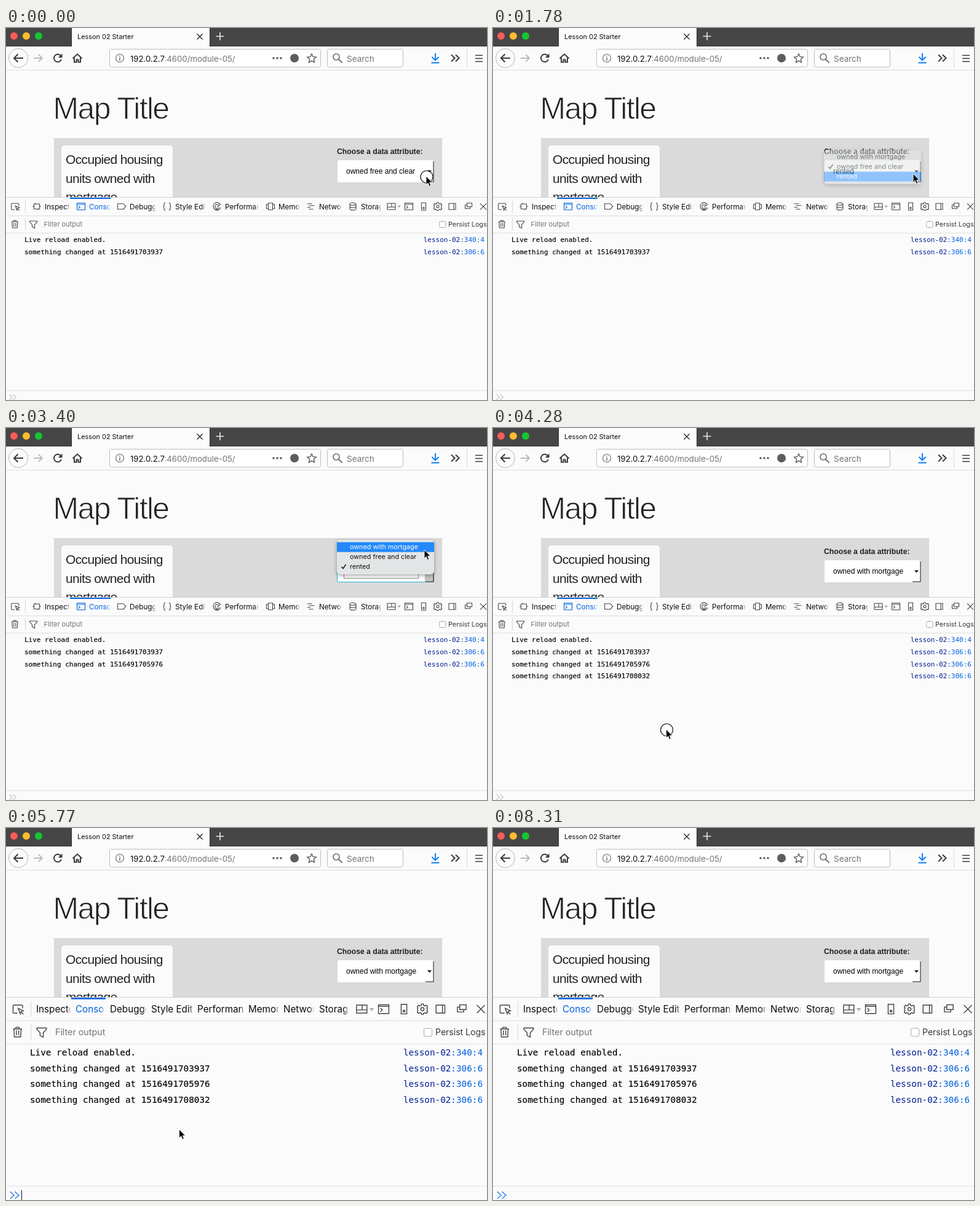
An HTML page that plays this animation: 782 by 605 pixels, repeating every 8460 ms.

```html
<!DOCTYPE html>
<html lang="en">
<head>
<meta charset="utf-8">
<title>Dropdown and console</title>
<style>
  html, body { margin: 0; width: 100%; height: 100%; overflow: hidden; background: #fbfbfb; }
  svg { display: block; }
  text { font-family: Inter, sans-serif; fill: #0c0c0d; white-space: pre; }
  .helv { font-family: "Liberation Sans", Arial, sans-serif; fill: #000; }
  .mono { font-family: "DejaVu Sans Mono", monospace; fill: #000; stroke: #000; stroke-width: .15; }
  .link { fill: #001c8f; stroke: none; }
  .dark { fill: #222; }
  .ico { fill: none; stroke: #45454a; stroke-width: 1.1; }
  .bold { fill: none; stroke: #3a3a3d; stroke-width: 2; }
  #menu { filter: drop-shadow(0 2px 3px rgba(0, 0, 0, .35)); }
</style>
</head>
<body>
<svg id="stage" width="782" height="605" viewBox="0 0 782 605"></svg>
<script>
const LOOP = 8460, BG = '#fbfbfb', BLUE = '#0060df', TOP = 276;
const OPTIONS = ['owned with mortgage', 'owned free and clear', 'rented'];

const text = (x, y, s, size, more = '') => `<text x="${x}" y="${y}" font-size="${size}" ${more}>${s}</text>`;
const rect = (x, y, w, h, fill, more = '') => `<rect x="${x}" y="${y}" width="${w}" height="${h}" fill="${fill}" ${more}/>`;
const path = (d, more = 'class="ico"') => `<path d="${d}" ${more}/>`;
const circle = (x, y, r, more) => `<circle cx="${x}" cy="${y}" r="${r}" ${more}/>`;
const group = (id, inner, more = '') => `<g id="${id}" ${more}>${inner}</g>`;

function browser() {
  const lights = ['#fc5b57', '#fdbc2e', '#14c732'].map((c, i) => circle(13 + 20 * i, 13, 6, `fill="${c}"`));
  const dots = [435, 441, 447].map(x => circle(x, 49, 1.8, 'fill="#5a5a5c"'));
  return rect(0, 0, 782, 30, '#464646') + rect(0, 29, 782, 1, '#363636') + lights.join('') +
    rect(106, 0, 226, 30, '#303030') + rect(107, 0, 224, 30, BG) +
    text(116, 18, 'Lesson 02 Starter', 10.9) +
    path('M310.5 9.5l9 9m0-9l-9 9', 'stroke="#3b3b3b" stroke-width="1.6"') +
    path('M341.5 13.5h13M348 7v13', 'stroke="#e2e2e2" stroke-width="1.7"') +
    rect(0, 30, 782, 38, BG) + rect(0, 68, 782, 1, '#dedede') +
    circle(20, 49, 15.5, 'fill="#fdfdfd" stroke="#b5b5b5"') +
    path('M28 49H13M19.5 42.5L13 49l6.5 6.5', 'class="bold"') +
    path('M45 49h14M53 43l6 6-6 6', 'fill="none" stroke="#bcbcbe" stroke-width="1.8"') +
    path('M89.3 45.5A6.2 6.2 0 1 0 90 51', 'class="bold"') +
    path('M91.5 41.5v6.8h-6.8z', 'fill="#3a3a3d"') +
    path('M108.5 49.5l7.5-7 7.5 7M111 48.5v7h3.5v-4h3v4h3.5v-7', 'class="bold"') +
    rect(168.5, 34.5, 343, 29, '#fff', 'rx="3" stroke="#bcbcbc"') +
    circle(185, 49, 6.5, 'class="ico" style="stroke:#6a6a6c"') +
    path('M185 48v5M185 45v1.5', 'stroke="#6a6a6c" stroke-width="1.5"') +
    text(202, 54.5, '192.0.2.7<tspan fill="#747476">:4600/module-05/</tspan>', 13.2) +
    dots.join('') + circle(469, 49, 7, 'fill="#5d5d60"') +
    path('M497 42l2.1 4.7 5.1.6-3.8 3.5 1 5-4.4-2.5-4.4 2.5 1-5-3.8-3.5 5.1-.6z', 'fill="none" stroke="#58585a" stroke-width="1.4"') +
    rect(522.5, 34.5, 123, 29, '#fff', 'rx="3" stroke="#bcbcbc"') +
    circle(537, 47, 5, 'fill="none" stroke="#707072" stroke-width="1.7"') +
    path('M540.5 50.5l6 6', 'stroke="#707072" stroke-width="2"') +
    text(554, 54.7, 'Search', 13.5, 'style="fill:#737375"') +
    path('M698 41v11M692.5 47l5.5 5.5 5.5-5.5M691.5 56.5h13', 'fill="none" stroke="#0a7cff" stroke-width="1.9"') +
    path('M724 43.5l5.5 5.5-5.5 5.5M731 43.5l5.5 5.5-5.5 5.5', 'class="bold"') +
    rect(749, 34, 1, 31, '#dcdcdc') +
    path('M763 44.5h12M763 49.5h12M763 54.5h12', 'class="bold" style="stroke-width:1.7"');
}

function page() {
  const card = ['Occupied housing', 'units owned with', 'mortgage'].map((s, i) =>
    text(97, 221 + 30.6 * i, s, 21, 'class="helv dark" letter-spacing="-.65"'));
  const bevel = path('M695 217V250H682', 'fill="none" stroke="#5c5c5c" stroke-width="1.5"');
  return rect(0, 69, 782, 207, BG) +
    text(76.5, 148, 'Map Title', 50, `class="helv dark" stroke="${BG}" stroke-width="1" letter-spacing="-1.65"`) +
    rect(78, 179, 631, 97, '#dadada') +
    rect(90, 191, 181, 100, BG, 'rx="5"') + card.join('') +
    text(538, 205, 'Choose a data attribute:', 12.2, 'class="helv dark" font-weight="700"') +
    rect(539, 215, 156, 36, '#fff', 'rx="3"') + bevel +
    path('M685 231.5h7l-3.5 3.7z', 'fill="#000"') +
    text(553, 237, '', 12, 'id="value" class="helv"') +
    group('focus', rect(538.5, 214.5, 157, 36, 'none', 'rx="3" stroke="#2bb3da"') +
      rect(681, 216, 13, 34, '#c4c4c4') +
      rect(549.5, 221.5, 121, 23, 'none', 'stroke="#222" stroke-dasharray="1 1"') + bevel);
}

const menu = () => group('menu',
  rect(538, 198, 158, 56, '#e2e6e6', 'rx="5"') +
  rect(538, 0, 158, 16, '#2389fb', 'id="bar"') +
  OPTIONS.map((s, i) => text(559, 213 + 16 * i, s, 10.8, 'class="opt"')).join('') +
  path('M545.5 0l2.5 3 4.5-6.5', 'id="check" fill="none" stroke-width="1.4"'));

// Panel icons, each centred on 0,0
const ICON = {
  inspect: 'M-4.5-4h9v8h-9zM-7 0h2.5M4.5 0h2.5M-2-6v2M2 4v2',
  console: 'M-6.5-5.5h13v11h-13zM-6.5-3.5h13M-4-1.2l2.2 2.2-2.2 2.2',
  debug: 'M-6.5-4.5h8.5q1 0 1.5.7l3.2 3.8-3.2 3.8q-.5.7-1.5.7h-8.5z',
  style: 'M-3-6q-2 0-2 2v2q0 2-1.5 2 1.5 0 1.5 2v2q0 2 2 2M3-6q2 0 2 2v2q0 2 1.5 2-1.5 0-1.5 2v2q0 2-2 2',
  perf: 'M5-4a6.2 6.2 0 1 0 1 5.5M3-2a3.5 3.5 0 1 0 .5 3.5M0 1l6-5M-3 5h6',
  memory: 'M-3.5-5.5h7v11h-7zM-3.5-3.5h-3v7h3M3.5-3.5h3v7h-3',
  network: 'M-6.5-4.5h8M-3.5-1.5h9M-6.5 1.5h6M-3.5 4.5h7',
  storage: 'M-5-4a5 2 0 0 1 10 0a5 2 0 0 1-10 0v8a5 2 0 0 0 10 0v-8M-5 0a5 2 0 0 0 10 0',
  pick: 'M-1 5h-4.5q-1 0-1-1v-8q0-1 1-1h10q1 0 1 1v3M0-1l6.5 3-3 1-1 3zM3 3l3.5 3.5',
  grid: 'M-7-5h13v10h-13zM-7 1h13M0-5v6',
  phone: 'M-3.5-6h7v12h-7zM-1 1.5h2v2h-2z',
  gear: 'M-1.2-6.5h2.4l.4 1.9 1.6.6 1.6-1 1.7 1.7-1 1.6.6 1.6v1.2l-.6 1 1 1.6-1.7 1.7-1.6-1-1.6.6-.4 1.5h-2.4l-.4-1.5-1.6-.6-1.6 1-1.7-1.7 1-1.6-.7-1.6v-1.2l.7-1-1-1.6 1.7-1.7 1.6 1 1.6-.6zM-2 0a2 2 0 1 0 4 0a2 2 0 1 0-4 0',
  dock: 'M-6-5h11v10h-11zM2-5v10',
  windows: 'M-2.5-5.5h8v6h-8zM-2.5-2.5h-3v6h8v-3',
  close: 'M-5-5L5 5M5-5L-5 5',
  trash: 'M-5.5-4h11M-2-4v-2h4v2M-4.5-4l.5 10h8l.5-10M-1.5-2v6M1.5-2v6',
  funnel: 'M-6-5.5h12v1.5l-4 4.5v5.5l-4-2v-3.5l-4-4.5z'
};
const icon = (name, x, y, z, color = '#45454a') =>
  path(ICON[name], `class="ico" style="stroke:${color}" transform="translate(${x} ${y}) scale(${z})"`);

const TABS = ['Inspector', 'Console', 'Debugger', 'Style Editor', 'Performance', 'Memory', 'Network', 'Storage'];
const TAB_ICONS = ['inspect', 'console', 'debug', 'style', 'perf', 'memory', 'network', 'storage'];
const TOOLS = ['grid', 'console', 'phone', 'gear', 'dock', 'windows', 'close'];
const LOG = ['Live reload enabled.', ...[703937, 705976, 708032].map(n => 'something changed at 1516491' + n)];

// Layout for each zoom level of the panel
const ZOOMS = [
  { z: 1, from: [43, 115, 181, 255, 336, 423, 489, 557], to: [103, 169, 243, 324, 410, 477, 545, 610],
    tools: [627, 655, 679, 702, 726, 752, 776], mark: [104, 66], persist: 719, prompt: 589, icons: 20 },
  { z: 1.09, from: [47, 116, 181, 253, 331, 415, 480, 544], to: [105, 168, 240, 318, 402, 466, 531, 594],
    tools: [613, 643, 670, 695, 720, 748, 775], mark: [105, 64], persist: 712, prompt: 587, icons: 22 },
  { z: 1.2, from: [50, 117, 182, 250, 328, 413, 474, 538], to: [106, 167, 238, 312, 396, 460, 522, 583],
    tools: [595, 629, 658, 686, 714, 745, 773], mark: [106, 62], persist: 705, prompt: 585, icons: 24 },
  { z: 1.3, from: [49, 113, 169, 236, 311, 394, 451, 509], to: [105, 160, 228, 304, 387, 443, 500, 556],
    tools: [579, 614, 647, 677, 707, 741, 772], mark: [106, 56], persist: 698, prompt: 582, icons: 0 }
];

function tab(L, i, y) {
  const { z, icons } = L, x = L.from[i] + icons, end = L.to[i];
  const color = i === 1 ? BLUE : '#0c0c0d';
  return (icons ? icon(TAB_ICONS[i], L.from[i] + 7 * z, y, z, i === 1 ? BLUE : undefined) : '') +
    `<svg x="${x}" y="${TOP + 3}" width="${end - x}" height="${24 * z}">` +
    text(0, y - TOP - 3 + 4.2 * z, TABS[i], 11.7 * z, `style="fill:${color}"`) + '</svg>' +
    rect(end - 6, TOP + 4, 7, 22 * z, 'url(#fade)');
}

function panel(L, k) {
  const { z } = L, y = TOP + 14.3 * z, y2 = TOP + 43 * z, right = 782 - 4 - 10 * (z - 1);
  const rule = v => rect(0, Math.round(v), 782, 1, '#dfdfe1');
  const box = 10 * z;
  const line = (s, i) => {
    const base = TOP + (72.3 + 19.7 * i) * z;
    return `<g class="log${i}">` + text(30 * z, base, s, 11 * z, 'class="mono"') +
      text(right, base, `lesson-02<tspan fill="${BLUE}">:${i ? '306:6' : '340:4'}</tspan>`, 11 * z,
        'class="mono link" text-anchor="end"') + '</g>';
  };
  const chevrons = path('M-6-4.5l5 4.5-5 4.5M0-4.5l5 4.5-5 4.5',
    `class="prompt" fill="none" stroke-width="1.1" transform="translate(${11.5 + (z - 1) * 10} ${605 - 4.5 - 11 * (z - 1)}) scale(${z})"`);
  return group('zoom' + k,
    rect(0, TOP, 782, 329, BG) +
    rule(TOP + 28.5 * z) + rule(TOP + 57.4 * z) + rule(L.prompt) +
    icon('pick', 15.3 * z, y, z) + rect(Math.round(31 * z), TOP + 5 * z, 1, 19 * z, '#d6d6d8') +
    TABS.map((_, i) => tab(L, i, y)).join('') +
    rect(L.mark[0], TOP, L.mark[1], 2 * z, '#0a64e6') +
    TOOLS.map((n, i) => icon(n, L.tools[i], y, z)).join('') +
    path(`M${L.tools[0] + 9 * z} ${y - 1.5}h${6 * z}l${-3 * z} ${3.5 * z}z`, 'fill="#aaaaad"') +
    icon('trash', 14.4 * z, y2, z) + rect(Math.round(31 * z), TOP + 33 * z, 1, 20 * z, '#d6d6d8') +
    icon('funnel', 44.6 * z, y2 + .5, z) +
    text(61.5 * z, y2 + 4 * z, 'Filter output', 11 * z, 'style="fill:#737378"') +
    rect(L.persist - 14.2 * z, y2 - box / 2 + .5, box, box, '#fff', 'rx="2" stroke="#a9a9ac"') +
    text(L.persist, y2 + 4 * z, 'Persist Logs', 10.8 * z, 'style="fill:#38383d"') +
    LOG.map(line).join('') + chevrons);
}

const stage = document.getElementById('stage');
stage.innerHTML = `<defs><linearGradient id="fade"><stop stop-color="${BG}" stop-opacity="0"/><stop offset="1" stop-color="${BG}"/></linearGradient></defs>` +
  browser() + page() + rect(0, 275, 782, 1, '#d2d2d4') +
  ZOOMS.map(panel).join('') +
  rect(25, 589, 1, 16, '#111', 'id="caret"') + menu() +
  group('pointer', circle(1, 1, 10, 'id="ring" fill="#fff" fill-opacity=".55" stroke="#111" stroke-width="1.2"') +
    path('M0 0V14L3.2 11.2 5.4 16.4 7.8 15.3 5.6 10.3H10Z', 'fill="#000" stroke="#fff" stroke-width=".9"'));

// State changes: [ms, changed values]; menu is its opacity
const STEPS = [
  [0, { x: 683, y: 241, ring: 1, value: 1, menu: 0, dy: 0, row: 1, focus: 0, logs: 2, zoom: 0, blue: 0, caret: 0, pointer: 1 }],
  [150, { ring: 0 }],
  [600, { x: 687, y: 240 }],
  [740, { x: 688, ring: 1, menu: 1, focus: 1 }],
  [1040, { ring: 0 }],
  [1190, { x: 687, row: 2 }],
  [1330, { x: 685, y: 238 }],
  [1480, { x: 683, y: 237, ring: 1 }],
  [1780, { ring: 0, menu: .5, value: 2, focus: 0 }],
  [1930, { menu: 0, logs: 3 }],
  [2510, { x: 685, y: 239 }],
  [2810, { ring: 1 }],
  [2960, { menu: 1, dy: -16, focus: 1 }],
  [3100, { ring: 0 }],
  [3250, { x: 683, y: 213, row: 1 }],
  [3400, { x: 680, y: 198, row: 0 }],
  [3550, { ring: 1 }],
  [3690, { ring: 0 }],
  [3840, { x: 449, y: 420, menu: .5, value: 0, focus: 0 }],
  [3990, { x: 325, y: 474, menu: 0, logs: 4 }],
  [4140, { x: 281.5, y: 490 }],
  [4280, { ring: 1 }],
  [4430, { ring: 0, blue: 1, caret: 1 }],
  [5030, { zoom: 1, caret: 0 }],
  [5480, { zoom: 2, caret: 1 }],
  [5630, { zoom: 3 }],
  [6070, { caret: 0 }],
  [6670, { caret: 1 }],
  [6820, { pointer: 0 }],
  [7270, { caret: 0 }],
  [7860, { caret: 1 }],
  [8310, { caret: 0 }]
];

const $ = id => document.getElementById(id);
const all = (css, fn) => stage.querySelectorAll(css).forEach(fn);
const show = (el, on) => { el.style.display = on ? '' : 'none'; };

function render(s) {
  ZOOMS.forEach((_, i) => show($('zoom' + i), i === s.zoom));
  LOG.forEach((_, i) => all('.log' + i, el => show(el, i < s.logs)));
  all('.prompt', el => el.setAttribute('stroke', s.blue ? '#2f7fe8' : '#c3c3c6'));
  for (const id of ['ring', 'focus', 'caret', 'pointer']) show($(id), s[id]);
  $('caret').setAttribute('x', 21 + Math.round(13 * (ZOOMS[s.zoom].z - 1)));
  $('value').textContent = OPTIONS[s.value];
  $('pointer').setAttribute('transform', `translate(${s.x} ${s.y})`);
  show($('menu'), s.menu);
  $('menu').setAttribute('opacity', s.menu);
  $('menu').setAttribute('transform', `translate(0 ${s.dy})`);
  $('bar').setAttribute('y', 201.7 + 16 * s.row);
  const ticked = s.dy ? 2 : 1;
  const ink = i => i === s.row ? '#fff' : '#111';
  all('.opt', (el, i) => { el.style.fill = ink(i); });
  $('check').setAttribute('transform', `translate(0 ${209.5 + 16 * ticked})`);
  $('check').setAttribute('stroke', ink(ticked));
}

const start = performance.now();
let last = -1;
function tick(now) {
  const t = Math.max(0, now - start) % LOOP;
  const past = STEPS.filter(([at]) => at <= t);
  if (past.length !== last) {
    last = past.length;
    render(Object.assign({}, ...past.map(([, change]) => change)));
  }
  requestAnimationFrame(tick);
}
tick(start);
</script>
</body>
</html>
```
